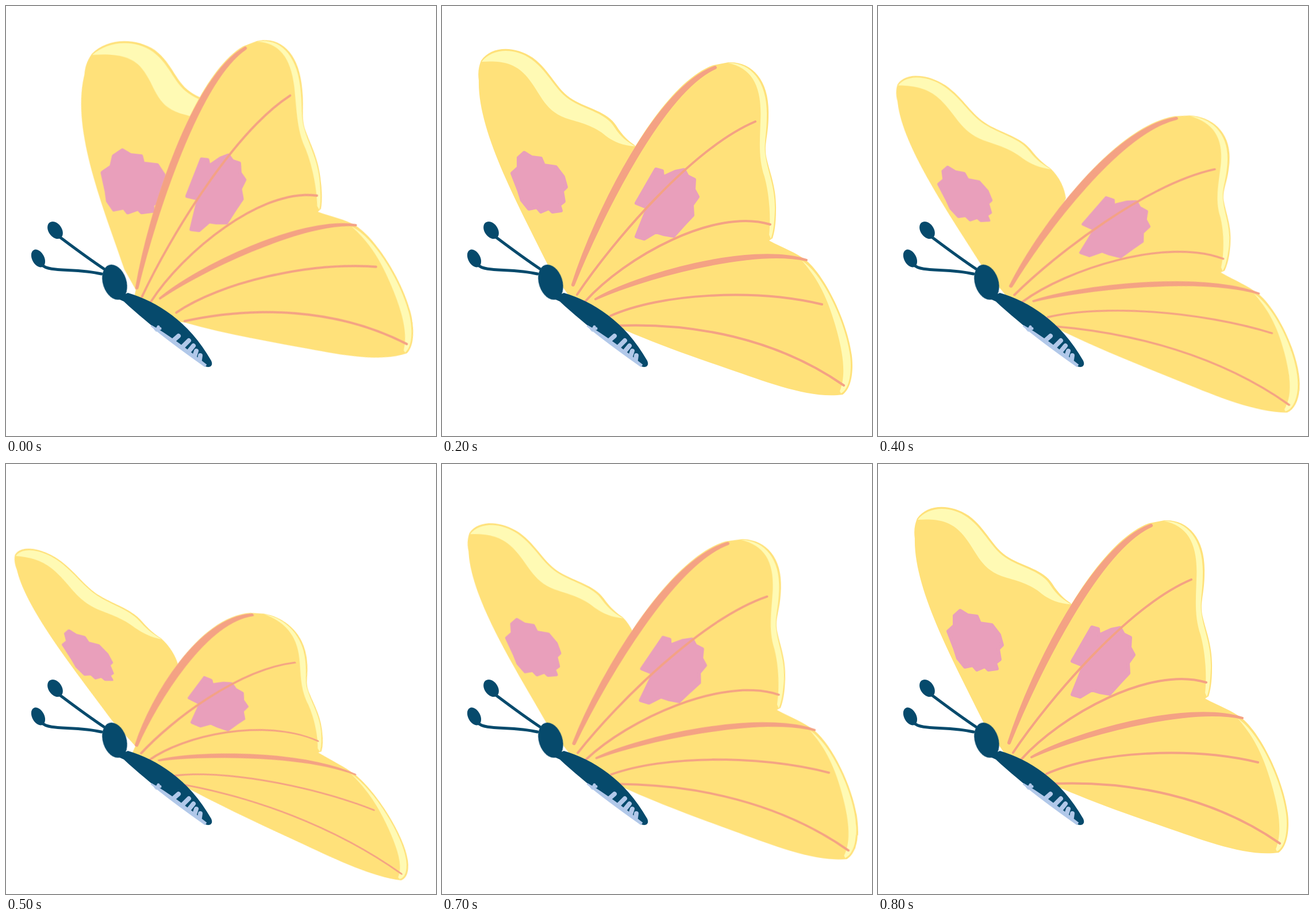
An HTML page for the animation above (0.9 s loop, 748x748 px).

```html
<!DOCTYPE html>
<html lang="en">
<head>
<meta charset="utf-8">
<title>Butterfly</title>
<style>
  html, body { margin: 0; width: 100%; height: 100%; overflow: hidden; background: #fff; }
  svg { display: block; width: 100%; height: 100%; }

  /* Each wing is drawn once and sheared about a point near its root. */
  .far, .near { animation: 900ms step-end infinite; }
  .far { transform-origin: 206px 360px; animation-name: far; }
  .near { transform-origin: 228px 487px; animation-name: near; }
  @keyframes far {
    0%, 100% { transform: matrix(1.204, -.012, -.236, 1.055, 47, 1); }
    22.222%, 88.888% { transform: matrix(1, 0, 0, 1, 0, 0); }
    33.333%, 77.777% { transform: matrix(.962, .041, .066, .922, -8, 10); }
    44.444%, 66.666% { transform: matrix(.936, .068, .109, .869, -14, 16); }
    55.555% { transform: matrix(.844, .121, .196, .766, -22, 18); }
  }
  @keyframes near {
    0%, 100% { transform: matrix(.951, -.162, .123, .996, 0, 5); }
    22.222%, 88.888% { transform: matrix(1, 0, 0, 1, 0, 0); }
    33.333%, 77.777% { transform: matrix(1.027, .043, -.036, .948, 1.5, 1); }
    44.444%, 66.666% { transform: matrix(1.054, .122, -.072, .852, 3, 2); }
    55.555% { transform: matrix(.947, .202, .086, .733, -1, 4); }
  }

  path { stroke-linecap: round; stroke-linejoin: round; }
  .wing { fill: #ffe17a; }
  .glow { fill: #fffab4; }
  .spot { fill: #e99fbb; stroke: #e99fbb; stroke-width: 6; }
  .vein { fill: none; stroke: #f4a284; stroke-width: 4; }
  .rib { fill: #f4a284; stroke: #f4a284; }
  .navy { fill: #064a6c; }
  .feeler { fill: none; stroke: #064a6c; stroke-width: 5; }
  .pale { fill: #b1c8e9; stroke: #b1c8e9; stroke-width: 2; }
  .bars { fill: none; stroke: #b1c8e9; stroke-width: 8; }
</style>
</head>
<body>
<svg viewBox="0 0 748 748">
  <g class="far">
    <path class="wing" d="M68 95C85 70 125 68 158 90C190 114 198 145 228 163C253 178 288 184 303 208C315 227 325 235 335 242C350 258 357 280 357 300L300 420L228 515L185 452C135 350 62 220 64 130C62 115 64 105 68 95Z"/>
    <path class="glow" d="M69 97C87 74 125 71 156 93C188 117 196 148 227 166C252 181 286 187 300 211C311 228 322 236 336 244C315 243 300 237 285 226C265 208 240 203 215 195C175 180 172 150 145 120C125 98 100 95 69 97Z"/>
    <path class="spot" d="M122 291L133 281L133 264L143 255L156 263L172 265L177 277L198 280L211 297L216 315L209 322L212 340L204 346L207 356L192 358L186 352L172 358L165 350L151 353L139 338L134 322Z"/>
  </g>

  <g class="near">
    <path class="wing" d="M215 515L226 487C266 357 374 138 472 103L498 98C540 96 570 130 568 190C568 225 560 240 564 262C570 290 582 315 581 355C581 380 578 395 575 404L569 408C595 422 615 428 634 443C672 475 714 570 714 625C714 650 708 668 697 676C640 684 565 654 500 632C430 608 365 585 305 558L255 545Z"/>
    <path class="glow" d="M497 99C538 98 566 132 565 190C565 225 559 240 563 262C567 290 580 315 579 355C578 380 576 395 572 405L569 398C572 370 570 330 561 297C550 265 553 235 554 200C557 140 540 108 497 99Z"/>
    <path class="glow" d="M626 443C668 470 711 570 711 625C711 650 705 668 694 674L692 670C704 640 697 600 684 555C668 500 650 470 626 443Z"/>
    <path class="spot" d="M338 343L372 284L383 287L384 298L406 288L421 285L427 296L439 302L438 319L445 332L435 346L436 364L420 381L403 400L385 397L372 393L352 405L338 401L358 351L348 347Z"/>
    <path class="vein" d="M235 502C298 408 436 247 545 201"/>
    <path class="vein" d="M249 514C318 437 475 350 571 380"/>
    <path class="vein" d="M293 539C380 500 542 491 661 519"/>
    <path class="vein" d="M306 556C435 551 580 577 699 660"/>
    <path class="rib" stroke-width="6" d="M228 485C268 359 376 142 475 107C384 148 276 365 228 485Z"/>
    <path class="rib" stroke-width="4" d="M267 510C337 469 536 411 634 442C536 420 339 477 267 510Z"/>
  </g>

  <g>
    <path class="feeler" d="M91 400C115 418 140 437 170 457"/>
    <path class="feeler" d="M62 450C75 464 120 455 166 466"/>
    <ellipse class="navy" rx="11.5" ry="16.5" transform="translate(85.5 390) rotate(-35)"/>
    <ellipse class="navy" rx="10.5" ry="16.5" transform="translate(56 439) rotate(-28)"/>
    <path class="navy" d="M192 508L212 499C262 514 318 548 357 617C361 626 355 630 347 627C310 600 250 556 205 514Z"/>
    <path class="pale" d="M253 556C285 574 320 602 348 624L346 627C315 605 280 580 253 557Z"/>
    <path class="bars" stroke-width="8" d="M292 581L300 574M307 593L318 582M317 602L326 591M328 609L331 600M337 615L338 608"/>
    <path class="bars" style="stroke-width:5" d="M260 562L268 561M262 564L265 558"/>
    <ellipse class="navy" rx="20.5" ry="31.5" transform="translate(189 480.5) rotate(-18)"/>
  </g>
</svg>
</body>
</html>
```
